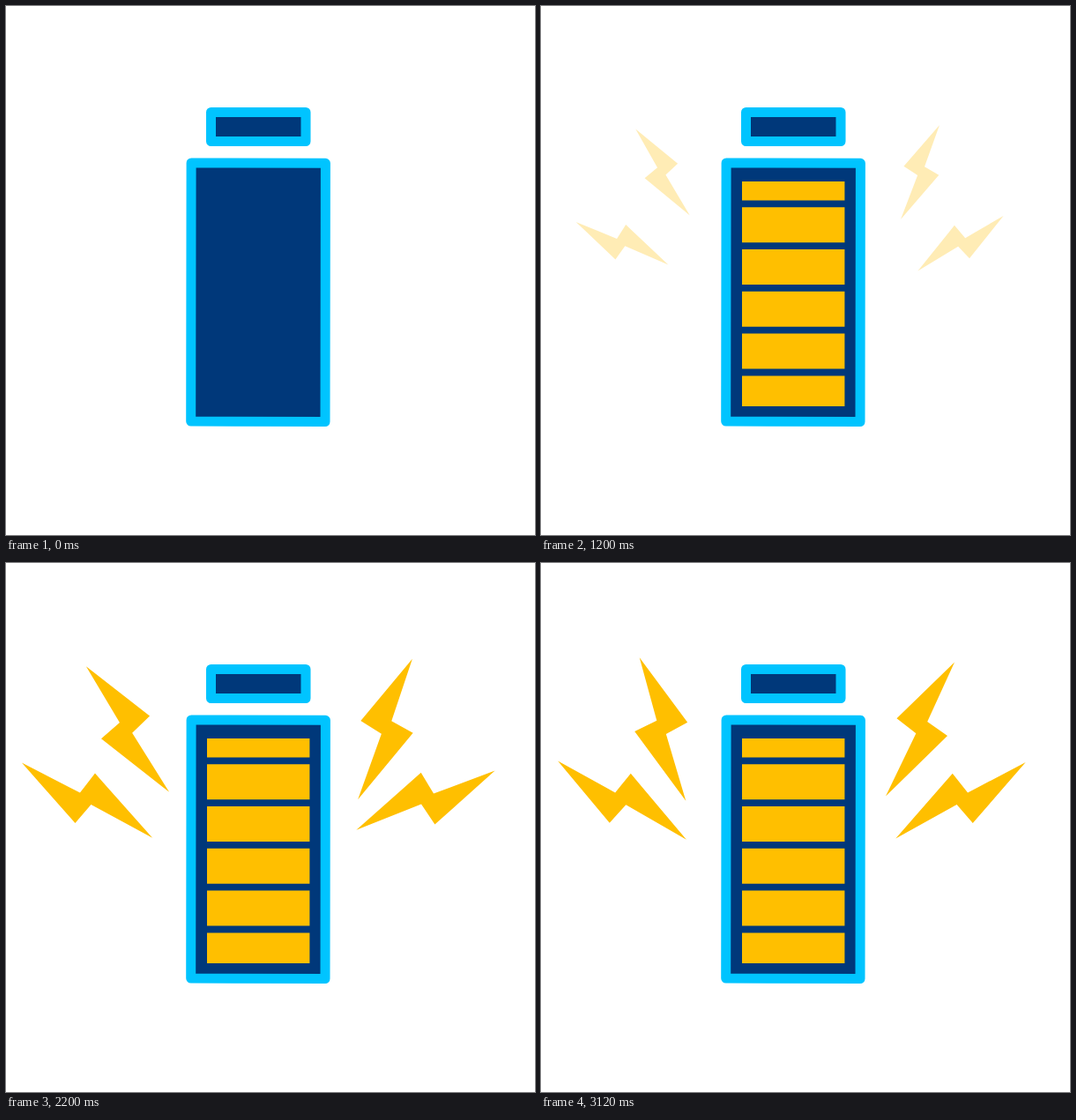
An HTML page for the animation above (3160 ms loop, 600 by 600 pixels).

```html
<!DOCTYPE html>
<html lang="en">
<head>
<meta charset="utf-8">
<title>Charging battery</title>
<style>
  html, body { margin: 0; width: 100%; height: 100%; overflow: hidden; background: #fff; }
  svg { display: block; width: 100vw; height: 100vh; }
  .case { fill: #00387a; stroke: #00c4ff; stroke-width: 11; stroke-linejoin: round; }
  .charge { fill: #ffbf00; }
</style>
</head>
<body>
<svg id="stage" viewBox="0 0 600 600">
  <path class="case" d="M232.5 120.5H340V153.5H232.5Z"/>
  <path class="case" d="M210.1 178L362.4 178.3L362 471.5L209.7 471.1Z"/>
</svg>
<script>
const LOOP = 3160, STEP = 40;
const stage = document.getElementById('stage');

const clamp = x => Math.min(1, Math.max(0, x));

// Eases from 0 to 1, passing 1 by about 14 % on the way.
function overshoot(x) {
  const u = clamp(x) - 1, c = 2.1;
  return 1 + (c + 1) * u ** 3 + c * u ** 2;
}

function addShape(d) {
  const el = document.createElementNS('http://www.w3.org/2000/svg', 'path');
  el.setAttribute('class', 'charge');
  el.setAttribute('d', d);
  stage.append(el);
  return el;
}

function place(el, transform, opacity) {
  el.setAttribute('transform', transform);
  el.setAttribute('opacity', opacity);
}

// Bars are evenly stacked from the bottom; the end ones are cut by the case padding.
function bar(i) {
  const row = 419.4 - 47.8 * i;
  const top = Math.max(row, 199), bottom = Math.min(row + 40, 454);
  const half = (bottom - top) / 2;
  const el = addShape(`M-58.2 ${-half}H58.2V${half}H-58.2Z`);
  return t => {
    const age = Math.max(0, t - 120 - 150 * i);
    const scale = 1 + .3 * (overshoot(age / 320) - 1);
    place(el, `translate(286.2 ${top + half}) scale(${scale})`, 1 - 2 ** (-age / 40));
  };
}

// A bolt on one side (-1 left, 1 right) that trembles around its tilt, in degrees.
function bolt(side, upper, tilt, swing, period, phase) {
  const el = addShape('M85.5 0L-1.2 29.2L-6.3 2L-85.5 0L7.5-31L11.3-3.4Z');
  const [reach, y] = upper ? [146, 188.5] : [192, 269.2];
  return t => {
    const turn = phase * Math.PI / 180 + (t - 1400) / period * 2 * Math.PI;
    const angle = swing * Math.cos(turn) - tilt;
    const size = overshoot((t - 1155) / 264);
    place(el, `translate(${284 + side * reach} ${y}) scale(${side} 1) rotate(${angle})
      scale(${size} ${upper ? -size : size})`, clamp((t - 1105) / 328));
  };
}

const parts = [
  ...Array.from({ length: 6 }, (_, i) => bar(i)),
  bolt(-1, true, 64.5, 8, 203, 28),
  bolt(-1, false, 27.1, 4.8, 181, -25),
  bolt(1, true, 65.6, 3.8, 203, -127),
  bolt(1, false, 26.8, 7, 190.6, -130)
];

const begin = performance.now();
function draw(now) {
  // The motion runs in 40 ms steps; the small lead absorbs clock jitter.
  const t = Math.max(0, now - begin + 8) % LOOP;
  const stepped = Math.floor(t / STEP) * STEP;
  parts.forEach(part => part(stepped));
  requestAnimationFrame(draw);
}
draw(begin);
</script>
</body>
</html>
```
